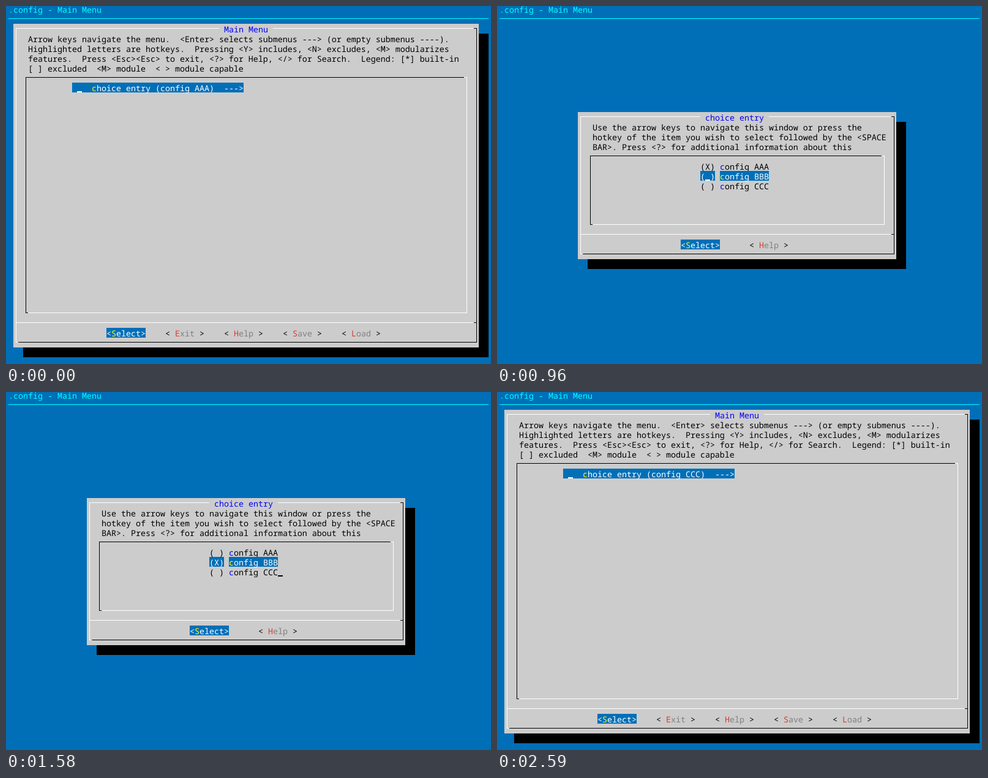
An HTML page that plays this animation: 792x584 px, repeating every 2.68 s.

```html
<!DOCTYPE html>
<html lang="en">
<head>
<meta charset="utf-8">
<title>Menu configuration</title>
<style>
html, body { margin: 0; width: 100%; height: 100%; overflow: hidden; background: #006fb8; }
svg { display: block; width: 792px; height: 584px; }
text {
  font: 13.3333px "Noto Sans Mono", "DejaVu Sans Mono", monospace;
  font-variant-ligatures: none;
  text-rendering: geometricPrecision;
  white-space: pre;
}
</style>
</head>
<body>
<svg id="stage" viewBox="0 0 792 584" shape-rendering="crispEdges"></svg>
<script>
const stage = document.getElementById('stage');
const BLUE = '#006fb8', GREY = '#cccccc', BLACK = '#000000', WHITE = '#ffffff',
      CYAN = '#00ffff', TITLE = '#0000ff', YELLOW = '#ffff00', RED = '#de382b', DIM = '#808080';
const LOOP = 2680;
const NAMES = ['AAA', 'BBB', 'CCC'];

// Character cells are 8 x 16 pixels.
const px = col => 4 + 8 * col;
const py = row => 16 * row - 3;

const esc = s => s.replace(/&/g, '&amp;').replace(/</g, '&lt;').replace(/>/g, '&gt;');
const rect = (x, y, w, h, fill) =>
  `<rect x="${x}" y="${y}" width="${w}" height="${h}" fill="${fill}"/>`;
const cells = (col, row, w, h, fill) => rect(px(col), py(row), 8 * w, 16 * h, fill);
const text = (col, row, s, fill) =>
  `<text x="${px(col)}" y="${py(row) + 14}" fill="${fill}" xml:space="preserve">${esc(s)}</text>`;
const lines = (col, row, list) => list.map((s, i) => text(col, row + i, s, BLACK)).join('');
const cursor = (col, row, fill) => rect(px(col), py(row) + 14, 8, 2, fill);

// Box border: one colour for top and left, the other for bottom and right.
function border(col, row, w, h, lit, shade) {
  const x = px(col) + 4, y = py(row) + 7, dx = 8 * (w - 1), dy = 16 * (h - 1);
  return rect(x, y, dx - 4, 1, lit) + rect(x, y, 1, dy + 1, lit) +
    rect(x, y + dy, 4, 1, lit) + rect(x + 4, y + dy, dx - 3, 1, shade) +
    rect(x + dx - 4, y, 5, 1, shade) + rect(x + dx, y, 1, dy + 1, shade);
}

function dialog(col, row, w, h, title, titleCol) {
  const sepY = py(row + h - 3) + 7, end = px(col + w - 1);
  return cells(col + 2, row + 1, w, h, BLACK) +
    cells(col, row, w, h, GREY) +
    border(col, row, w, h, WHITE, BLACK) +
    rect(px(col) + 4, sepY, end - px(col) - 4, 1, WHITE) +
    rect(end, sepY, 4, 1, BLACK) +
    cells(titleCol - 1, row, title.length + 2, 1, GREY) +
    text(titleCol, row, title, TITLE);
}

const selectButton = (col, row) =>
  cells(col, row, 8, 1, BLUE) + text(col, row, '<', WHITE) +
  text(col + 1, row, 'S', YELLOW) + text(col + 2, row, 'elect>', WHITE);

const button = (col, row, label) =>
  text(col, row, '<', BLACK) + text(col + 2, row, label[0], RED) +
  text(col + 3, row, label.slice(1), DIM) + text(col + 7, row, '>', BLACK);

const header = () =>
  rect(0, 0, 792, 584, BLUE) + text(0, 0, '.config - Main Menu', CYAN) +
  rect(4, 20, 784, 1, CYAN);

function mainMenu(marked, blink) {
  return dialog(1, 2, 95, 33, 'Main Menu', 44) +
    lines(4, 3, [
      'Arrow keys navigate the menu.  <Enter> selects submenus ---> (or empty submenus ----).',
      'Highlighted letters are hotkeys.  Pressing <Y> includes, <N> excludes, <M> modularizes',
      'features.  Press <Esc><Esc> to exit, <?> for Help, </> for Search.  Legend: [*] built-in',
      '[ ] excluded  <M> module  < > module capable'
    ]) +
    border(3, 7, 91, 25, BLACK, WHITE) +
    cells(13, 8, 35, 1, BLUE) + text(17, 8, 'c', YELLOW) +
    text(18, 8, `hoice entry (config ${NAMES[marked]})  --->`, WHITE) +
    (blink ? cursor(14, 8, WHITE) : '') +
    selectButton(20, 33) +
    ['Exit', 'Help', 'Save', 'Load'].map((s, i) => button(32 + 12 * i, 33, s)).join('');
}

function choiceItem(i, selected, marked) {
  const row = 16 + i, ink = selected ? WHITE : BLACK;
  return (selected ? cells(41, row, 3, 1, BLUE) + cells(45, row, 10, 1, BLUE) : '') +
    text(41, row, marked ? '(X)' : '( )', ink) +
    text(45, row, 'c', selected ? YELLOW : TITLE) +
    text(46, row, 'onfig ' + NAMES[i], ink);
}

function choiceList(marked, selected, blink, atEnd) {
  return dialog(16, 11, 65, 15, 'choice entry', 42) +
    lines(19, 12, [
      'Use the arrow keys to navigate this window or press the',
      'hotkey of the item you wish to select followed by the <SPACE',
      'BAR>. Press <?> for additional information about this'
    ]) +
    border(18, 15, 61, 8, BLACK, WHITE) +
    NAMES.map((_, i) => choiceItem(i, i === selected, i === marked)).join('') +
    (!blink ? '' : atEnd ? cursor(55, 18, BLACK) : cursor(42, 16 + selected, WHITE)) +
    selectButton(37, 24) + button(51, 24, 'Help');
}

// Scenes: start time, view. Cursor toggles run separately.
const scenes = [
  [0, b => mainMenu(0, b)],
  [320, b => choiceList(0, 0, b, true)],
  [640, b => choiceList(0, 1, b, false)],
  [1040, b => mainMenu(1, b)],
  [1580, b => choiceList(1, 1, b, true)],
  [1810, b => choiceList(1, 2, b, false)],
  [2220, b => mainMenu(2, b)]
];
const toggles = [90, 320, 470, 640, 730, 960, 1110, 1350, 1740, 1810, 1990, 2130, 2360, 2590];

let shown = '';
function draw(t) {
  const index = scenes.filter(s => s[0] <= t).length - 1;
  const blink = toggles.filter(x => x <= t).length % 2 === 0;
  const key = index + ':' + blink;
  if (key === shown) return;
  shown = key;
  stage.innerHTML = header() + scenes[index][1](blink);
}

const start = performance.now();
function tick() {
  draw((performance.now() - start) % LOOP);
  requestAnimationFrame(tick);
}
draw(0);
requestAnimationFrame(tick);
</script>
</body>
</html>
```
